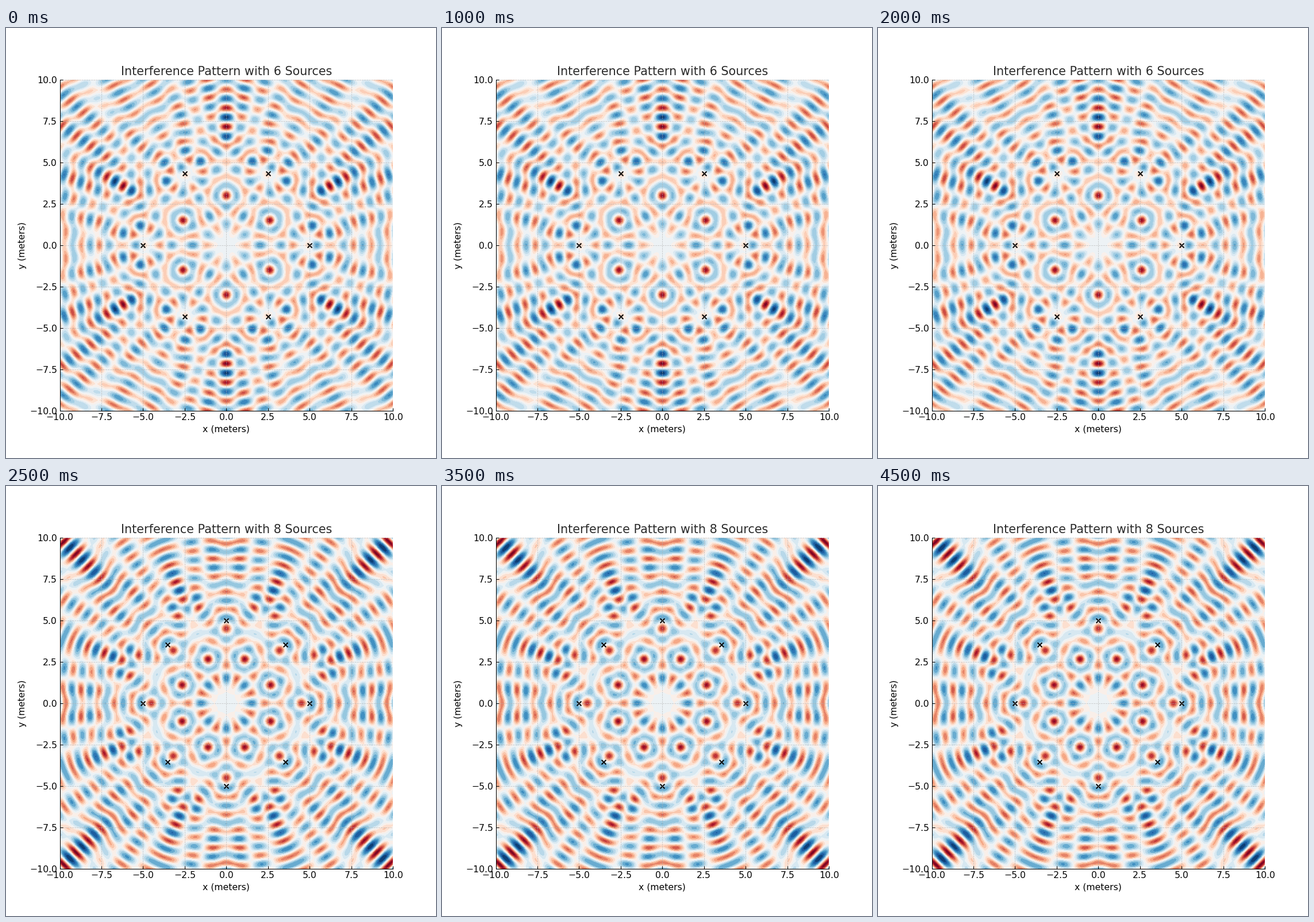
These frames come from a looping animation (748x748 px, 5000 ms). A matplotlib script:

```python
import numpy as np
import matplotlib.pyplot as plt
from matplotlib.animation import FuncAnimation

plt.rcParams.update({
    "font.family": "DejaVu Sans",
    "font.size": 12,
    "axes.titlesize": 16,
    "axes.titlecolor": "#2b2b2b",
    "axes.spines.top": False,
    "axes.spines.right": False,
    "xtick.direction": "in",
    "ytick.direction": "in",
})

LIMIT = 10
RADIUS = 5
WAVELENGTH = 1
COUNTS = (6, 8)

axis = np.linspace(-LIMIT, LIMIT, 500)
X, Y = np.meshgrid(axis, axis)


def ring(count):
    angle = 2 * np.pi * np.arange(count) / count
    return RADIUS * np.cos(angle), RADIUS * np.sin(angle)


def wave_sum(xs, ys):
    k = 2 * np.pi / WAVELENGTH
    return sum(np.sin(k * np.hypot(X - x, Y - y)) for x, y in zip(xs, ys))


def build_scene(count):
    xs, ys = ring(count)
    field = ax.contourf(X, Y, wave_sum(xs, ys), levels=20, cmap="RdBu")
    marks = ax.scatter(xs, ys, color="black", marker="x")
    return field, marks


fig, ax = plt.subplots(figsize=(8, 8), dpi=93.5)
scenes = [build_scene(count) for count in COUNTS]
ax.set_xlim(-LIMIT, LIMIT)
ax.set_ylim(-LIMIT, LIMIT)
ax.set_xlabel("x (meters)")
ax.set_ylabel("y (meters)")
ax.grid(True, linestyle="--", linewidth=0.6, color="#b0b0b0", alpha=0.7)
title = ax.set_title("")


def update(frame):
    shown = frame % len(scenes)
    for i, scene in enumerate(scenes):
        for artist in scene:
            artist.set_visible(i == shown)
    title.set_text(f"Interference Pattern with {COUNTS[shown]} Sources")
    return [title]


anim = FuncAnimation(fig, update, frames=10, interval=500, repeat=True)
plt.show()
```
